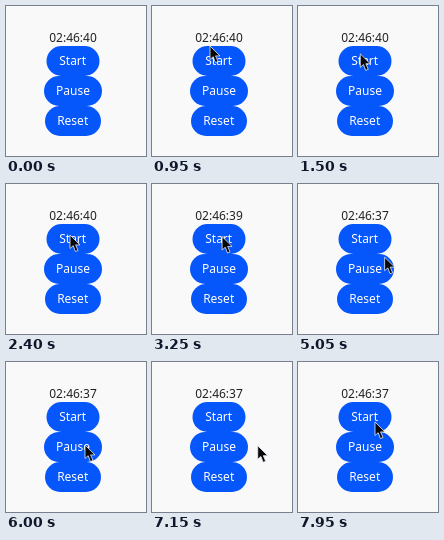
Animation of 140x150 px, one loop 8 s. Source, as an HTML page:

```html
<!DOCTYPE html>
<html lang="en">
<head>
<meta charset="utf-8">
<title>Countdown</title>
<style>
  html, body { margin: 0; width: 100%; height: 100%; overflow: hidden; background: #f9f9f9; }
  svg { display: block; width: 140px; height: 150px; }
  text { font: 500 12px "Noto Sans", sans-serif; text-anchor: middle; fill: #fff; }
  #time { font-weight: 400; fill: #222; }
  rect { fill: #0556fb; }
</style>
</head>
<body>
<svg viewBox="0 0 140 150">
  <text id="time" x="67" y="36.3">02:46:40</text>
  <rect x="40.5" y="40" width="53" height="30" rx="15"/>
  <rect x="38" y="70" width="58" height="30" rx="15"/>
  <rect x="39" y="100" width="56" height="30" rx="15"/>
  <text x="66.7" y="59">Start</text>
  <text x="67" y="89">Pause</text>
  <text x="66.7" y="119">Reset</text>
  <path id="cursor" d="M0 0V13.5L3.2 10.7L5.4 16.5L8 15.5L5.6 9.9H10Z"
        fill="#080808" stroke="#e8edf5" stroke-width=".8" stroke-linejoin="round"/>
</svg>
<script>
const LOOP = 8000;
const ticks = [2700, 3700, 4700];
// Pointer stops: time, x, y
const stops = [
  [0, 56, 34], [950, 58, 40], [1800, 64, 51], [2400, 64, 51], [2750, 69, 52],
  [3700, 71, 53], [4400, 96, 64], [4650, 93, 65], [5500, 79, 83], [6000, 79, 83],
  [6350, 106, 84], [7100, 106, 84], [7950, 77, 60], [LOOP, 77, 60]
];
const time = document.getElementById('time');
const cursor = document.getElementById('cursor');

function pointerAt(t) {
  const i = stops.findIndex(stop => stop[0] > t);
  const [t0, x0, y0] = stops[i - 1], [t1, x1, y1] = stops[i];
  const u = (t - t0) / (t1 - t0), k = u * u * (3 - 2 * u);
  return [x0 + (x1 - x0) * k, y0 + (y1 - y0) * k];
}

function draw(now) {
  const t = now % LOOP;
  time.textContent = '02:46:' + (40 - ticks.filter(tick => t >= tick).length);
  cursor.setAttribute('transform', `translate(${pointerAt(t)})`);
  cursor.style.display = t < 50 ? 'none' : '';
}

let start;
function frame(now) {
  start ??= now;
  draw(now - start);
  requestAnimationFrame(frame);
}
draw(0);
requestAnimationFrame(frame);
</script>
</body>
</html>
```
